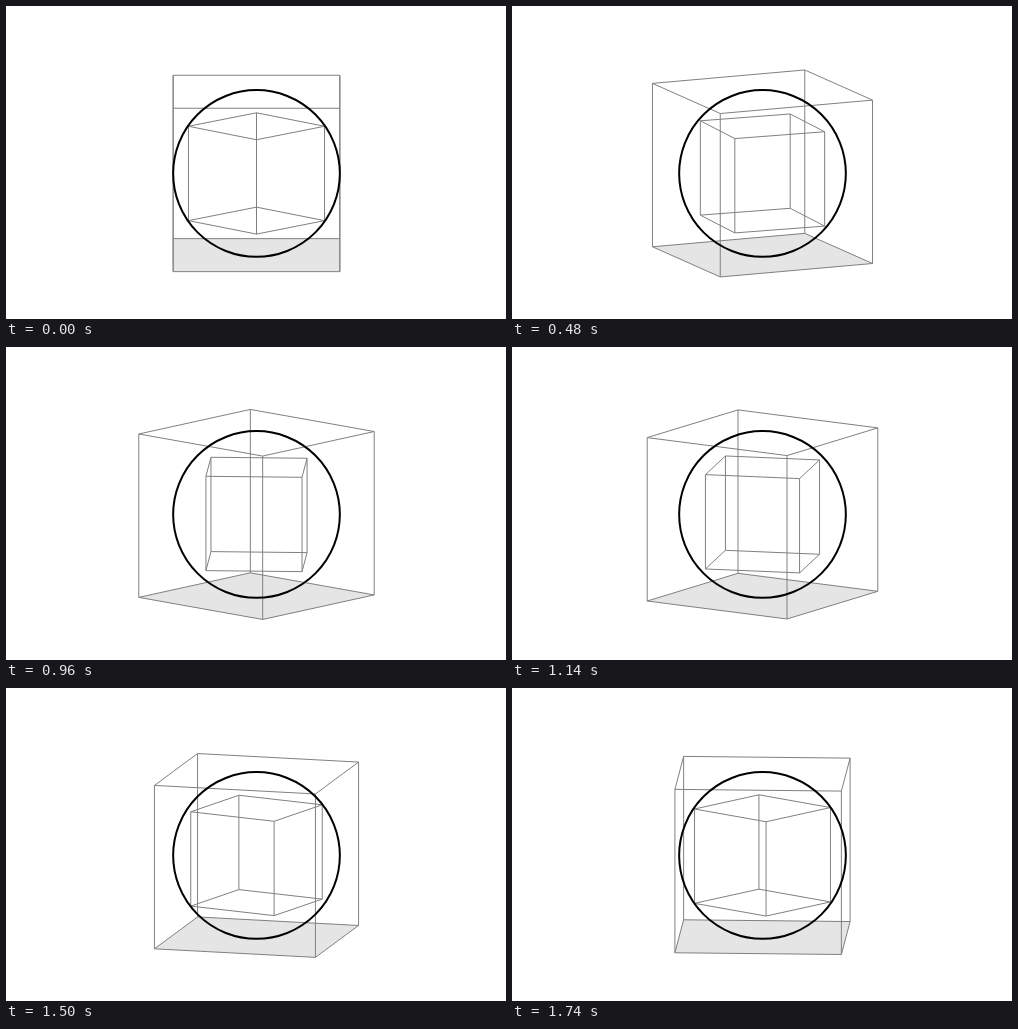
Animation of 500 by 313 pixels, one loop 1.8 s. Source, as an HTML page with a canvas:

```html
<!DOCTYPE html>
<html lang="en">
<head>
<meta charset="utf-8">
<title>Nested cubes and sphere</title>
<style>
  html, body { margin: 0; width: 100%; height: 100%; overflow: hidden; background: #fff; }
  canvas { display: block; width: 500px; height: 313px; }
</style>
</head>
<body>
<canvas id="stage" width="500" height="313"></canvas>
<script>
const ctx = document.getElementById('stage').getContext('2d');
const LOOP = 1800, STEPS = 30;
const CX = 250.5, CY = 167.45, R = 83.35;
const TILT = Math.asin(0.198);
const SIN = Math.sin(TILT), COS = Math.cos(TILT);

// Orthographic view of a horizontal square, spun about the vertical axis.
function square(half, height, angle) {
  return [0, 1, 2, 3].map(i => {
    const a = angle + Math.PI / 4 + i * Math.PI / 2;
    const r = half * Math.SQRT2;
    return [CX + r * Math.cos(a), CY + r * Math.sin(a) * SIN - height * COS];
  });
}

function trace(points) {
  points.forEach(([x, y], i) => i ? ctx.lineTo(x, y) : ctx.moveTo(x, y));
  ctx.closePath();
}

function cube(half, angle, floor) {
  const top = square(half, half, angle);
  const base = square(half, -half, angle);
  if (floor) {
    ctx.beginPath();
    trace(base);
    ctx.fillStyle = floor;
    ctx.fill();
  }
  ctx.beginPath();
  trace(top);
  trace(base);
  top.forEach((p, i) => {
    ctx.moveTo(...p);
    ctx.lineTo(...base[i]);
  });
  ctx.strokeStyle = '#808080';
  ctx.lineWidth = 1;
  ctx.stroke();
}

function draw(now) {
  const step = Math.floor((now % LOOP) / LOOP * STEPS);
  const turn = step / STEPS * Math.PI / 2;

  ctx.fillStyle = '#fff';
  ctx.fillRect(0, 0, 500, 313);
  ctx.lineJoin = 'round';

  // The cubes turn in opposite directions.
  cube(R, -turn, '#e5e5e5');
  cube(R / Math.sqrt(3), Math.PI / 4 + turn);

  ctx.beginPath();
  ctx.arc(CX, CY, R, 0, Math.PI * 2);
  ctx.strokeStyle = '#000';
  ctx.lineWidth = 2;
  ctx.stroke();
}

function tick() {
  draw(performance.now());
  requestAnimationFrame(tick);
}
tick();
</script>
</body>
</html>
```
